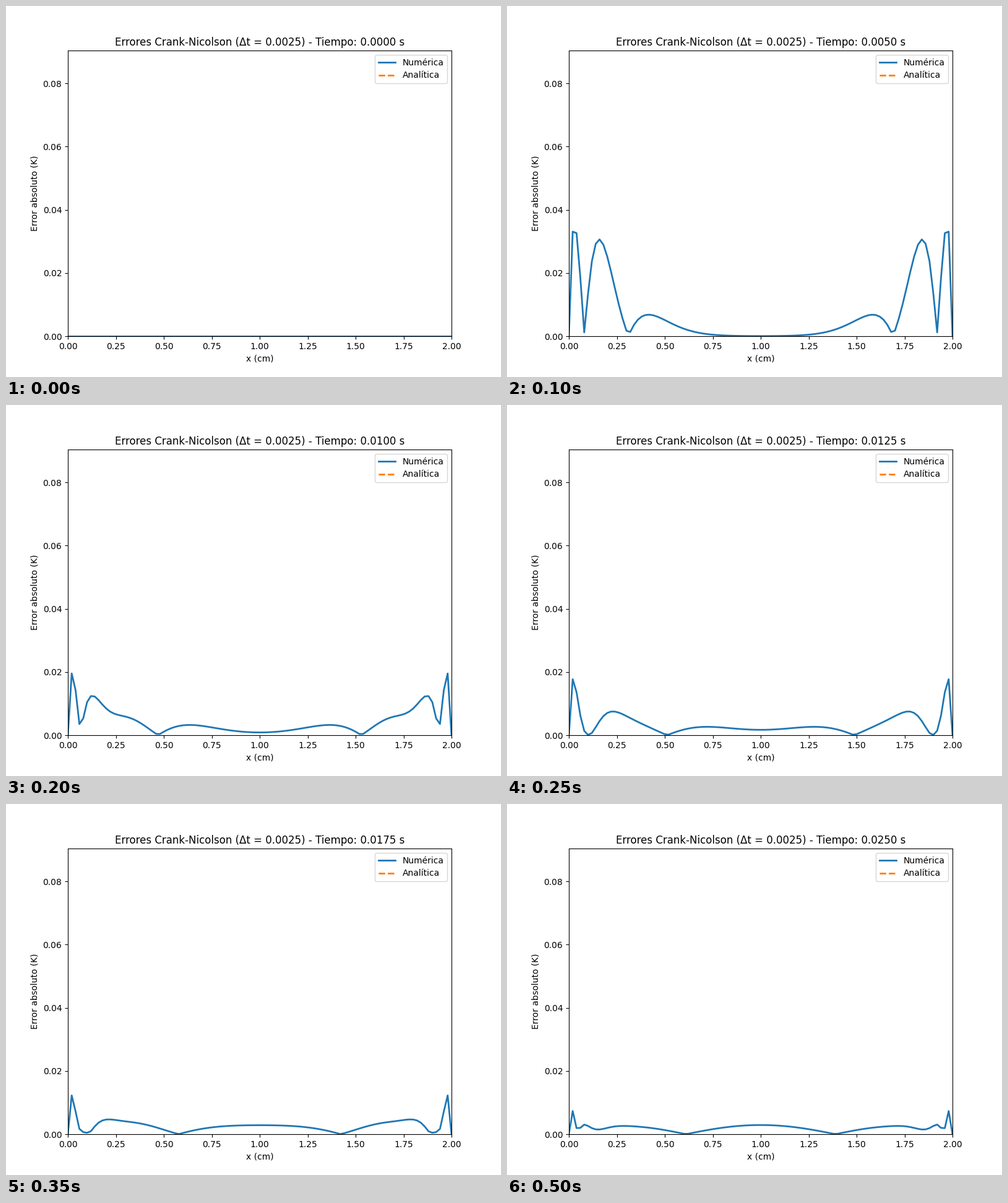
A matplotlib script for the animation above (0.55 s loop, 800 px wide and 600 px high).

```python
import numpy as np
import matplotlib.pyplot as plt
from matplotlib.animation import FuncAnimation

# Heated slab between two cold walls: u_t = u_zz + 1, scaled to kelvin
LENGTH = 2.0                              # cm
SCALE = 0.472 * 40**2 / (2 * 0.56)        # K
N, DT, STEPS = 101, 0.0025, 10

z = np.linspace(0, 1, N)


def crank_nicolson():
    """Return the numerical solution at every time step."""
    m = N - 2
    r = DT / (z[1] - z[0])**2
    lap = np.eye(m, k=1) + np.eye(m, k=-1) - 2 * np.eye(m)
    left = np.eye(m) - r / 2 * lap
    right = np.eye(m) + r / 2 * lap
    u = np.zeros((STEPS + 1, N))
    for i in range(STEPS):
        u[i + 1, 1:-1] = np.linalg.solve(left, right @ u[i, 1:-1] + DT)
    return u


def analytic(t):
    """Return the sine series solution at time t."""
    n = np.arange(1, 1000, 2)
    coef = 4 / (np.pi * n)**3 * (1 - np.exp(-(np.pi * n)**2 * t))
    u = np.sin(np.pi * np.outer(z, n)) @ coef
    u[[0, -1]] = 0
    return u


times = DT * np.arange(STEPS + 1)
exact = np.array([analytic(t) for t in times])
error = SCALE * np.abs(crank_nicolson() - exact)

fig, ax = plt.subplots(figsize=(8, 6), dpi=100)
line, = ax.plot([], [], lw=2, label="Numérica")
ax.plot([], [], "--", lw=2, label="Analítica")
ax.set_xlim(0, LENGTH)
ax.set_ylim(0, error.max())
ax.set_xlabel("x (cm)")
ax.set_ylabel("Error absoluto (K)")
ax.legend()


def update(i):
    line.set_data(LENGTH * z, error[i])
    ax.set_title(f"Errores Crank-Nicolson (Δt = {DT}) - Tiempo: {times[i]:.4f} s")
    return line,


anim = FuncAnimation(fig, update, frames=STEPS + 1, interval=50,
                     repeat=True, repeat_delay=0, blit=False)
plt.show()
```
